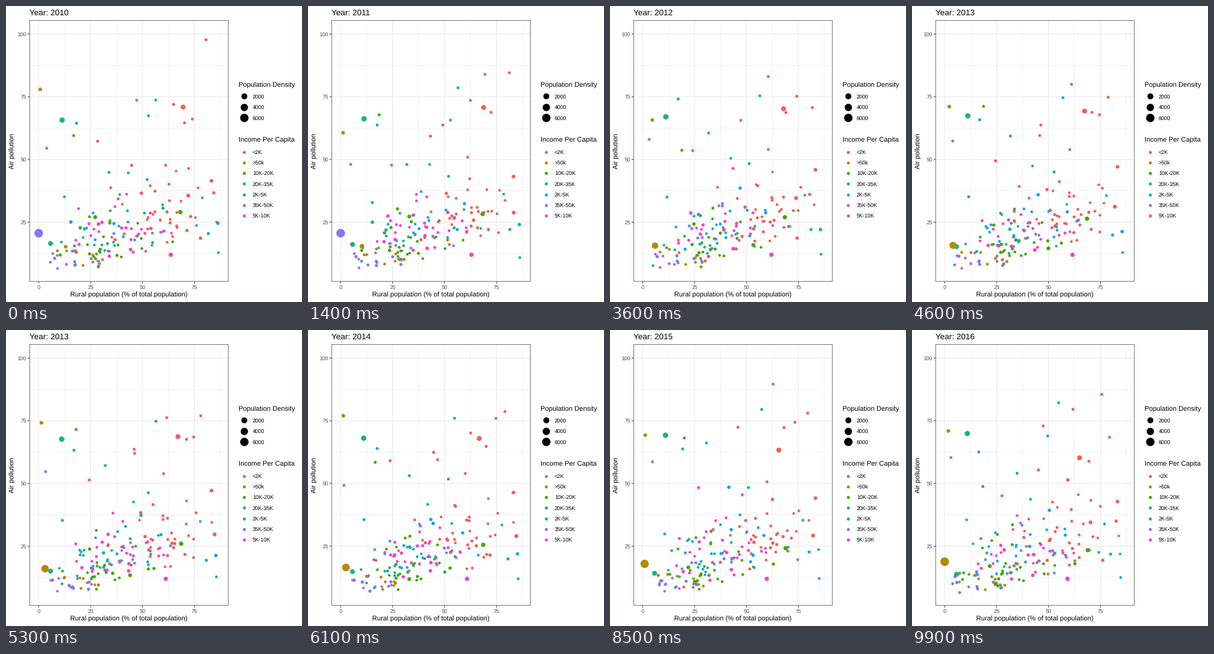
Animation of 480x480 px, one loop 10 s. Source, as a matplotlib script:

```python
import numpy as np
import matplotlib.pyplot as plt
from matplotlib.animation import FuncAnimation

plt.rcParams.update({"font.family": "Liberation Sans", "path.snap": False,
                     "text.hinting": "none"})

SIZE, DPI, FRAMES, YEARS = 480, 80, 100, 7
PT = 72 / DPI  # points per pixel
LEFT, RIGHT, TOP, BOTTOM = 38.5, 360.5, 23.5, 446.5
XLIM, YLIM = (-4.31, 91.3), (1.4, 105.41)

COLORS = {
    "<2K": "#F35E55", ">50k": "#B58900", "10K-20K": "#40A800",
    "20K-35K": "#17B585", "2K-5K": "#18A5E5", "35K-50K": "#9070FF",
    "5K-10K": "#F93FCC",
}

t = np.arange(FRAMES)
rng = np.random.default_rng(7)
dots = []  # (colour, x, y, diameter), the last three per frame


def spread(values):
    """Linear motion through evenly spaced key values."""
    values = np.atleast_1d(values)
    return np.interp(t, np.linspace(0, FRAMES - 1, len(values)), values)


def add(group, diameter, x, y):
    dots.append((COLORS[group], spread(x), spread(y), spread(diameter)))


def cloud(group, n, x_shape, y_median, y_sigma):
    """Small dots that swap places as rows enter and leave the group."""
    x = rng.triangular(*x_shape, n)
    y = y_median * np.exp(y_sigma * rng.standard_normal(n))
    diameter = 4.3 + np.minimum(rng.exponential(0.45, n), 2)
    xs, ys = [], []
    for year in range(YEARS):
        if year:
            cut = rng.integers(0, n)
            step = rng.choice([-1, 1])
            for values in (x, y):
                values[cut:] = np.roll(values[cut:], step)
        xs.append(x - 0.3 * year)
        ys.append(np.clip(y * rng.normal(1, 0.06, n), 6.5, 54))
    for j, d in enumerate(diameter):
        add(group, d, np.array(xs)[:, j], np.array(ys)[:, j])


def outliers(group, n, x_range, y_range, diameter=4.8):
    """Dots high above the crowd that reach a new level every year."""
    for home in np.linspace(*x_range, n):
        add(group, diameter, home + rng.normal(0, 1.5, YEARS),
            rng.uniform(*y_range, YEARS))


cloud("<2K", 37, (32, 66, 88), 28, 0.33)
cloud(">50k", 8, (4, 14, 42), 10.5, 0.22)
cloud("10K-20K", 26, (3, 28, 66), 19, 0.33)
cloud("20K-35K", 10, (3, 14, 52), 17, 0.4)
cloud("2K-5K", 31, (12, 48, 92), 22, 0.35)
cloud("35K-50K", 12, (1, 14, 40), 11, 0.3)
cloud("5K-10K", 29, (10, 24, 82), 22, 0.27)

outliers("<2K", 4, (62, 81), (58, 100))
outliers("<2K", 1, (47, 47), (57, 74))
outliers(">50k", 1, (2, 2), (57, 88), 6)
outliers("10K-20K", 1, (19, 19), (42, 84))
outliers("20K-35K", 1, (18, 18), (43, 86))
outliers("2K-5K", 1, (57, 57), (70, 88))
outliers("2K-5K", 2, (33, 51), (43, 70))
outliers("35K-50K", 1, (4, 4), (38, 62))
outliers("5K-10K", 2, (25, 45), (40, 66))

# Large dots drift steadily
add("<2K", 8, [69.5, 64.9], [70.9, 70.5, 67.5, 60.2])
add("<2K", 6, 83.2, [41.5, 47.5, 42.8])
add("10K-20K", 7, [68.2, 68.9], [29, 23.4])
add("20K-35K", 8.7, [11.3, 10.9], [65.7, 67.5, 69.9])
add("20K-35K", 8, 5.7, [16.5, 13.8])
add("5K-10K", 7, [63.6, 59.1], 12)
add("35K-50K", np.where(t <= FRAMES / 6, 14, 0), 0, 20.6)
add(">50k", [6, 12, 14], [13, 3.3, 0], [15.2, 15.8, 18.8])

colors = [d[0] for d in dots]
xs, ys, diameters = (np.array([d[k] for d in dots]).T for k in (1, 2, 3))

fig = plt.figure(figsize=(SIZE / DPI, SIZE / DPI), dpi=DPI, facecolor="white")

# Full-stage layer in pixels, y downwards
stage = fig.add_axes([0, 0, 1, 1])
stage.set(xlim=(0, SIZE), ylim=(SIZE, 0))
stage.axis("off")

panel = fig.add_axes([LEFT / SIZE, 1 - BOTTOM / SIZE,
                      (RIGHT - LEFT) / SIZE, (BOTTOM - TOP) / SIZE])
panel.set(xlim=XLIM, ylim=YLIM, xticks=[], yticks=[])
for spine in panel.spines.values():
    spine.set(color="#777777", linewidth=PT)


def label(x, y, text, px, color="black", **kw):
    return stage.text(x, y, text, fontsize=px * PT, color=color, **kw)


def to_px(x, y):
    px = LEFT + (x - XLIM[0]) / (XLIM[1] - XLIM[0]) * (RIGHT - LEFT)
    py = BOTTOM - (y - YLIM[0]) / (YLIM[1] - YLIM[0]) * (BOTTOM - TOP)
    return px, py


def grid(value, line, width):
    line(value, color="#E8E8E8", linewidth=width * PT, zorder=0.5)


for v in np.arange(12.5, 100, 25):
    grid(v, panel.axvline, 0.55)
    grid(v, panel.axhline, 0.55)

tick = dict(color="#333333", linewidth=PT)
for v in range(0, 101, 25):
    px, py = to_px(v, v)
    if v < 100:
        grid(v, panel.axvline, 1.07)
        stage.plot([px, px], [BOTTOM, BOTTOM + 3], **tick)
        label(px, 459, v, 8.8, "#4D4D4D", ha="center")
    if v > 0:
        grid(v, panel.axhline, 1.07)
        stage.plot([LEFT - 3, LEFT], [py, py], **tick)
        label(33, py + 3.2, v, 8.8, "#4D4D4D", ha="right")

title = label(38, 15, "", 13.2)
label(199.5, 472, "Rural population (% of total population)", 11, ha="center")
label(10.8, 235.5, "Air pollution", 11, rotation=90, ha="center", va="center")


def legend(heading, baseline, y, step, entries):
    label(377, baseline, heading, 11)
    for k, (name, color, diameter) in enumerate(entries):
        cy = y + k * step
        stage.scatter(386, cy, s=(diameter * PT) ** 2, c=color, linewidths=0)
        label(400, cy + 3.2, name, 8.8)


legend("Population Density", 132, 146.3, 17.5,
       [(n, "black", 4.4 + 5.3 * (n / 2000) ** 0.5)
        for n in (2000, 4000, 6000)])
legend("Income Per Capita", 221, 236.5, 17.28,
       [(name, color, 5) for name, color in COLORS.items()])

points = panel.scatter(xs[0], ys[0], c=colors, linewidths=0, zorder=2)


def draw(i):
    points.set_offsets(np.column_stack([xs[i], ys[i]]))
    points.set_sizes((diameters[i] * PT) ** 2)
    title.set_text(f"Year: {round(2010 + (YEARS - 1) * i / (FRAMES - 1))}")
    return points, title


anim = FuncAnimation(fig, draw, frames=FRAMES, interval=100,
                     repeat=True, repeat_delay=0)
plt.show()
```
